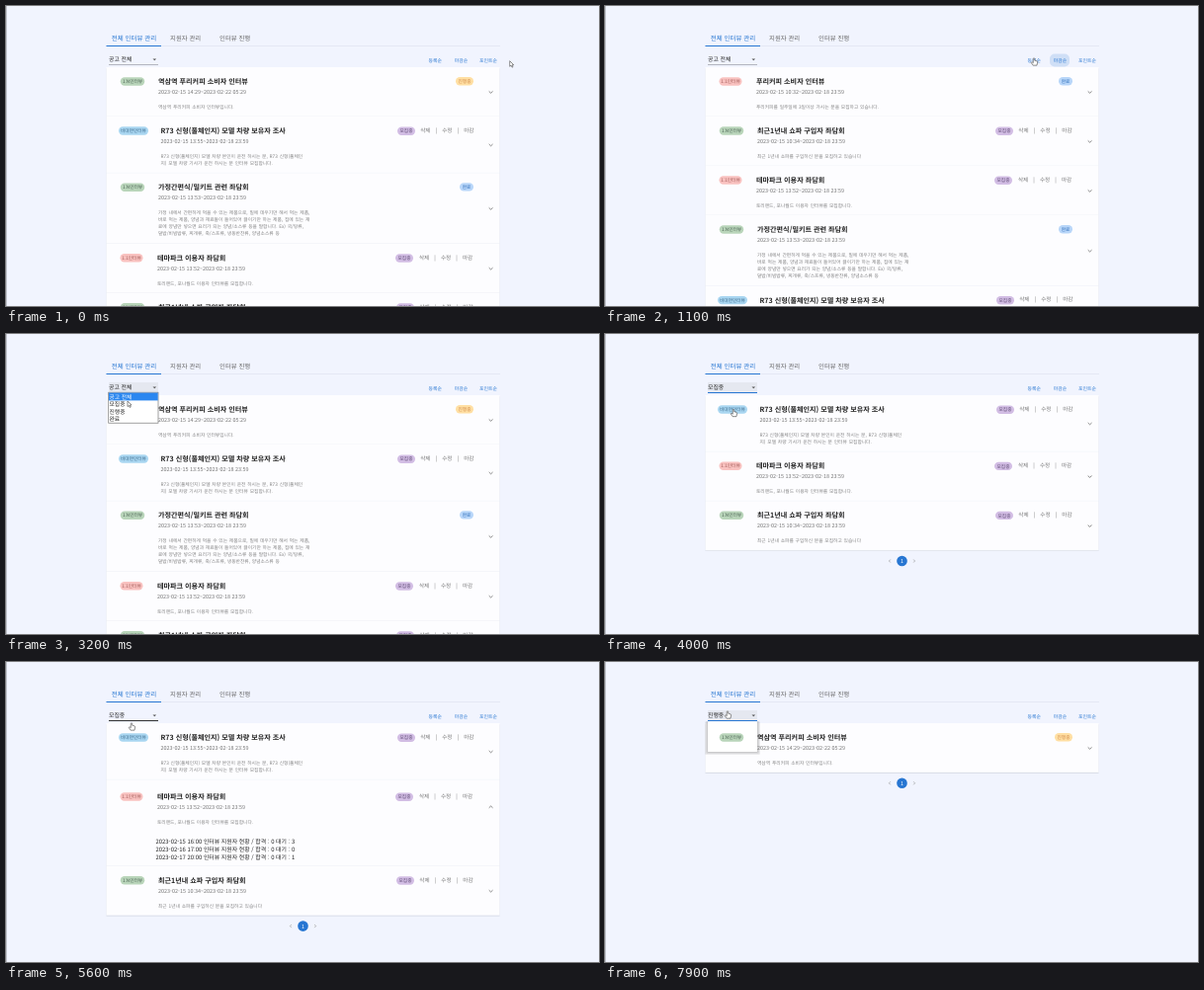
Animation of 600 by 304 pixels, one loop 8 s. Source, as an HTML page:

```html
<!DOCTYPE html>
<html lang="ko">
<head>
<meta charset="utf-8">
<style>
html, body { margin: 0; width: 100%; height: 100%; overflow: hidden; background: #f1f4fe; }
svg { display: block; width: 100vw; height: 100vh; text-rendering: geometricPrecision;
  font-family: "Noto Sans CJK KR", "Noto Sans CJK", "Noto Sans CJK JP", sans-serif; }
</style>
</head>
<body>
<svg id="stage" viewBox="0 0 600 304"></svg>
<script>
const LOOP = 8000, STEP = 100, BLUE = '#2776d2';
const stage = document.getElementById('stage');

const KINDS = {
  group:  { text: '1:N인터뷰', w: 24.5, fill: '#b9d5ba', ink: '#4b6253', x: 154 },
  single: { text: '1:1인터뷰', w: 23, fill: '#f9c2c0', ink: '#a05a57', x: 153 },
  remote: { text: '비대면인터뷰', w: 30, fill: '#a9d6f1', ink: '#3c6a8c', x: 156.5 }
};
const STATES = {
  open:    { text: '모집중', w: 18, fill: '#d2bde4', ink: '#5d4a72' },
  running: { text: '진행중', w: 18, fill: '#ffdfa3', ink: '#d08a4a', x: 464 },
  done:    { text: '완료', w: 14, fill: '#b8d6f9', ink: '#2c6cb8', x: 466 }
};

const item = (kind, state, title, start, end, ...lines) =>
  ({ kind: KINDS[kind], state: STATES[state], title, date: `2023-02-15 ${start}~2023-02-${end}`, lines });
const END = '18 23:59';
const station = item('group', 'running', '역삼역 푸리커피 소비자 인터뷰', '14:29', '22 05:29',
  '역삼역 푸리커피 소비자 인터뷰입니다.');
const car = item('remote', 'open', 'R73 신형(풀체인지) 모델 차량 보유자 조사', '13:55', END,
  'R73 신형(풀체인지) 모델 차량 본인이 운전 하시는 분, R73 신형(풀체인',
  '지) 모델 차량 기사가 운전 하시는 분 인터뷰 모집합니다.');
const meal = item('group', 'done', '가정간편식/밀키트 관련 좌담회', '13:53', END,
  '가정 내에서 간편하게 먹을 수 있는 제품으로, 밀에 데우기만 해서 먹는 제품,',
  '바로 먹는 제품, 양념과 재료들이 들어있어 끓이기만 하는 제품, 집에 있는 재',
  '료에 양념만 넣으면 요리가 되는 양념/소스류 등을 말합니다. Ex) 국/탕류,',
  '덮밥/비빔밥류, 찌개류, 죽/스프류, 냉동반찬류, 양념소스류 등');
const park = item('single', 'open', '테마파크 이용자 좌담회', '13:52', END,
  '토리랜드, 포나월드 이용자 인터뷰를 모집합니다.');
const sofa = item('group', 'open', '최근1년내 쇼파 구입자 좌담회', '10:34', END,
  '최근 1년내 쇼파를 구입하신 분을 모집하고 있습니다');
const coffee = item('single', 'done', '푸리커피 소비자 인터뷰', '10:32', END,
  '푸리커피를 일주일에 3일이상 가시는 분을 모집하고 있습니다.');
const SLOTS = ['15 16:00,3', '16 17:00,0', '17 20:00,1'].map(s => {
  const [when, waiting] = s.split(',');
  return `2023-02-${when} 인터뷰 지원자 현황 / 합격 : 0 대기 : ${waiting}`;
});

const byEntry = [station, car, meal, park, sofa];
const byDeadline = [coffee, sofa, park, meal, car];
const LISTS = [[0, byEntry], [900, byDeadline], [1500, byEntry], [3700, [car, park, sofa]], [6900, [station]]];
const LABELS = [[0, '공고 전체'], [3600, '모집중'], [6800, '진행중']];
const OPTIONS = ['공고 전체', '모집중', '진행중', '완료'];

// time, tip x, tip y, hand shape
const CURSOR = [
  [0, 509.7, 55.7, 0], [200, 509.7, 55.7, 0], [600, 460, 53, 1], [900, 460, 53, 1], [1100, 434, 52.5, 1],
  [1800, 434, 52.5, 1], [1900, 415, 49, 0], [2200, 200, 34, 0], [2400, 122, 36, 0], [2700, 122, 36, 0],
  [2900, 126, 53, 0], [3200, 123, 68, 0], [3400, 123, 70, 0], [3600, 123, 72, 1], [4000, 130, 76, 1],
  [4400, 271, 149.5, 1], [4900, 271, 149.5, 1], [5200, 200, 40, 0], [5600, 127, 61.5, 1],
  [5800, 126.5, 54, 0], [6400, 116, 78, 0], [6800, 116, 78, 0], [6900, 120, 79, 1], [7300, 210, 82, 1],
  [7500, 210, 82, 1], [7600, 124, 49.5, 1], [8000, 124, 49.5, 1]
];

const latest = (table, t) => table.filter(k => k[0] <= t).pop();
const clamp = v => Math.max(0, Math.min(1, v));
const smooth = v => (v = clamp(v)) * v * (3 - 2 * v);

// y is the vertical centre of the text
const text = (x, y, s, size, fill, more = '') =>
  `<text x="${x}" y="${y + size * .37}" font-size="${size}" fill="${fill}" ${more}>${s}</text>`;
const mid = 'text-anchor="middle"', medium = 'font-weight="500"';
const rect = (x, y, w, h, fill, more = '') =>
  `<rect x="${x}" y="${y}" width="${w}" height="${h}" fill="${fill}" ${more}/>`;
const stroke = (d, color, w) => `<path d="${d}" fill="none" stroke="${color}" stroke-width="${w}"/>`;
const pill = (c, x, y) => rect(x - c.w / 2, y - 4.2, c.w, 8.4, c.fill, 'rx="4.2"') +
  text(x, y, c.text, 4.7, c.ink, `${mid} ${medium}`);

function row(it, y, p) {
  const { kind, state, lines } = it, x = kind.x, remote = kind === KINDS.remote;
  const height = 50 + 7.2 * (lines.length - 1), full = height + 37.6 * p, top = y + 2.8 * p;
  let s = pill(kind, remote ? 129 : x - 26, top + 14.5) +
    text(x, top + 14.3, it.title, 7.1, '#222', 'font-weight="700"') +
    text(x, top + 25.2, it.date, 5.45, '#777');
  lines.forEach((line, i) =>
    s += text(x, top + 40.1 + 7.1 * i, line, 4.75, '#808080', 'word-spacing=".45"'));
  if (state.x) s += pill(state, state.x, top + 14.2);
  else {
    s += pill(state, remote ? 405 : 250 + x, top + 14.7);
    ['삭제', '|', '수정', '|', '마감'].forEach((word, i) =>
      s += text(424.5 + 11 * i + (x - 157) * .35, top + 13.7, word, 5.6, '#777', mid));
  }
  const cy = y + height / 2 + 3 * p, k = 1.2 * (1 - 2 * p);
  s += stroke(`M488.7 ${cy - k / 2}L490.6 ${cy + k}L492.5 ${cy - k / 2}`, '#666', .8);
  if (p) {
    s += `<clipPath id="fold">${rect(101, y, 399, full + 1, '#fff')}</clipPath><g clip-path="url(#fold)">` +
      SLOTS.map((line, i) => text(151.5, y + 62.8 + 7.8 * i, line, 5.92, '#222', medium)).join('') + '</g>';
  }
  return { body: s, height: full };
}

function header(t) {
  let s = rect(101.5, 40, 398.5, .6, '#dde2ee') + rect(101.5, 40, 55.5, 1, BLUE) +
    text(106.8, 32.7, '전체 인터뷰 관리', 6.5, BLUE, medium) +
    text(166, 32.7, '지원자 관리', 6.4, '#666', medium) +
    text(216, 32.7, '인터뷰 진행', 6.4, '#666', medium);
  for (const [start, x] of [[750, 460], [1250, 434.5]]) {
    const age = t - start, r = smooth(age / 350);
    if (age > 0 && age < 800)
      s += rect(x - 10 * r, 55 - 6.5 * r, 20 * r, 13 * r, BLUE,
        `rx="${5 * r}" opacity="${.17 * (1 - smooth((age - 350) / 450))}"`);
  }
  [[434.2, '등록순'], [460.5, '마감순'], [488, '포인트순']].forEach(([x, word]) =>
    s += text(x, 54.9, word, 4.85, BLUE, `${mid} ${medium}`));
  const focus = t >= 2900 && t < 4500 || t >= 5800;
  const hover = t >= 5500 && t < 5800;
  if (focus) s += rect(104, 49, 50, 10.5, '#e5e8f0');
  return s + rect(104, 59, 50, focus || hover ? 1 : .6, focus ? BLUE : hover ? '#333' : '#8a8d96') +
    text(104, 53.7, latest(LABELS, t)[1], 5.9, '#222', medium) +
    '<path d="M148.5 53.5h3.6l-1.8 1.8z" fill="#555"/>';
}

function menu(t) {
  const first = t >= 2900 && t < 3600, second = t >= 5900 && t < 6800;
  if (!first && !second) return '';
  const active = first ? (t < 3400 ? 0 : 1) : (t < 6200 ? 1 : 2);
  return rect(103.7, 59.2, 50.3, 31, '#fff', 'stroke="#777" stroke-width=".7"') +
    OPTIONS.map((word, i) => {
      const y = 59.6 + 7.5 * i;
      return (i === active ? rect(104, y, 49.7, 7.8, '#2b87f0') : '') +
        text(104.5, y + 4.2, word, 5.8, i === active ? '#fff' : '#222', medium);
    }).join('');
}

// the popup as it first appears, still without its options
const popup = () => [3, 2, 1].map(i =>
  rect(104 - i, 60, 50 + 2 * i, 31 + i, '#000', 'rx="1.5" opacity=".07"')).join('') +
  rect(104, 60, 50, 31, '#fff');

function pager(y) {
  return `<circle cx="300.5" cy="${y}" r="5.3" fill="${BLUE}"/>` + text(300.5, y, '1', 5.4, '#fff', mid) +
    stroke(`M288.8 ${y - 1.5}l-1.4 1.5l1.4 1.5M312.2 ${y - 1.5}l1.4 1.5l-1.4 1.5`, '#888', .6);
}

function cursor(t) {
  const i = CURSOR.findIndex(k => k[0] > t), a = CURSOR[i - 1], b = CURSOR[i];
  const p = smooth((t - a[0]) / (b[0] - a[0]));
  const x = a[1] + (b[1] - a[1]) * p, y = a[2] + (b[2] - a[2]) * p;
  const shape = a[3]
    ? 'M-.8 .8Q0-.5 .8 .8V3L3.5 3.8Q4.2 4 4 5.2L3.3 8.5H-1L-3 5.6Q-3 4.5-1.8 5L-.8 5.8Z'
    : 'M0 0V6.2L1.5 4.9L2.6 7.2L3.6 6.7L2.6 4.5H4.5Z';
  return `<path transform="translate(${x} ${y}) scale(.9)" d="${shape}" fill="#fff" stroke="#555" stroke-width=".75" stroke-linejoin="round"/>`;
}

function draw(t) {
  const list = latest(LISTS, t)[1];
  let y = 62, cards = '', body = '';
  for (const it of list) {
    const p = it === park && t < 6900 ? smooth((t - 4530) / 240) : 0;
    const r = row(it, y, p);
    cards += rect(101.5, y, 398, r.height, '#fdfdff') +
      rect(101.5, y + r.height - .3, 398, .5, '#eceef5');
    body += r.body;
    y += r.height;
  }
  const shadow = rect(101.2, 62.4, 398.6, y - 62, '#dfe3ef', 'rx="1.5"') +
    rect(101.5, y, 398, .6, '#cdd1dd');
  stage.innerHTML = rect(0, 0, 600, 304, '#f1f4fe') + rect(0, 0, .8, 304, '#b4b7c0') +
    header(t) + cards.replace(/^/, shadow) + (t >= 7900 ? popup() : '') + body +
    pager(y + 10.8) + menu(t) + cursor(t);
}

let shown = -1;
function tick(now) {
  const t = Math.floor(now % LOOP / STEP) * STEP;
  if (t !== shown) draw(shown = t);
  requestAnimationFrame(tick);
}
draw(0);
requestAnimationFrame(tick);
</script>
</body>
</html>
```
